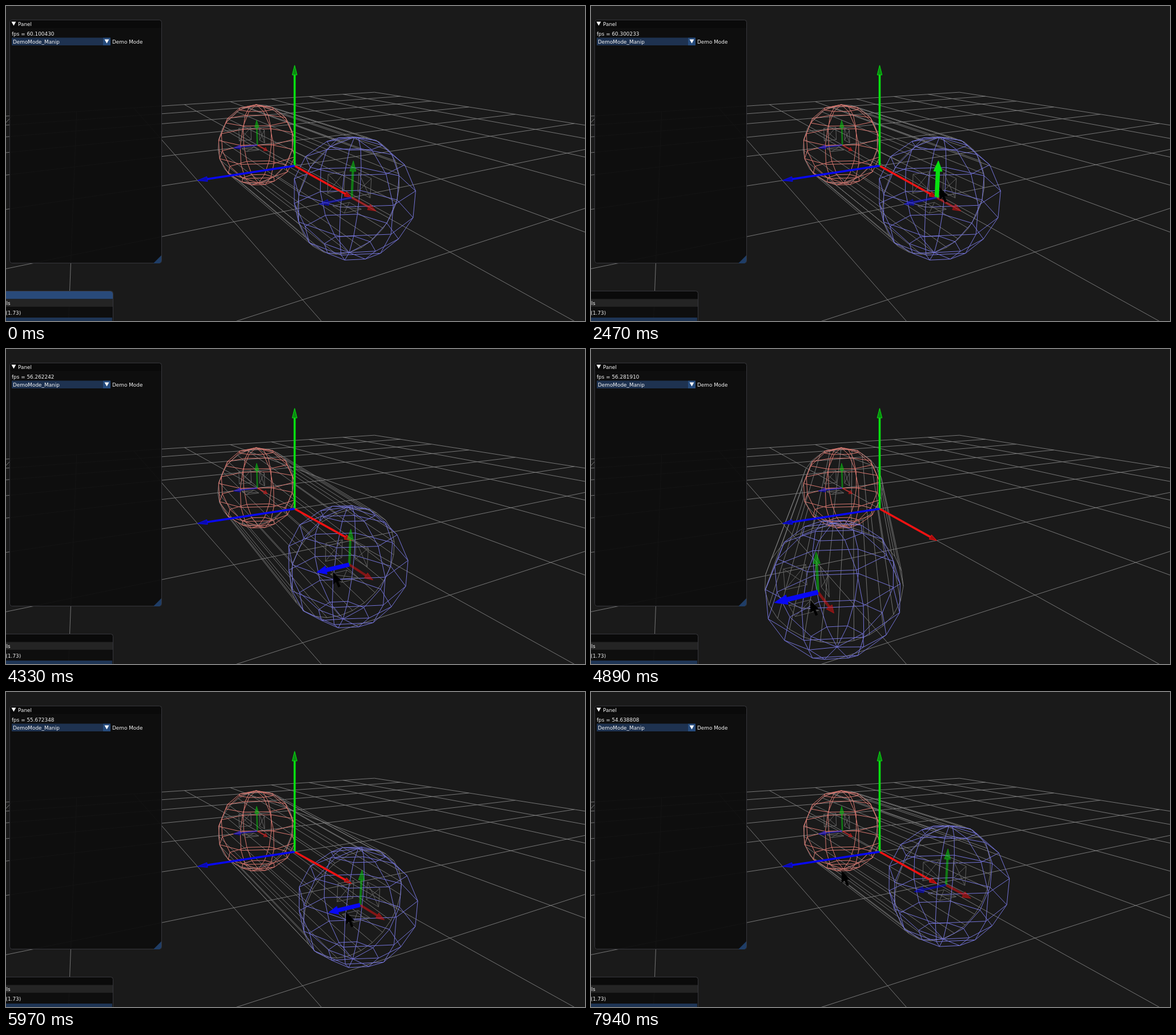
Recreate the animation shown at these times as an HTML page with a canvas. Size 1014 by 552 pixels, loop 8 s.

```html
<!DOCTYPE html>
<html lang="en">
<head>
<meta charset="utf-8">
<title>Gizmo demo</title>
<style>
html, body { margin: 0; width: 100%; height: 100%; overflow: hidden; background: #1a1a1a; }
canvas { display: block; width: 1014px; height: 552px; }
</style>
</head>
<body>
<canvas id="stage" width="1014" height="552"></canvas>
<script>
const ctx = document.getElementById('stage').getContext('2d');
const LOOP = 8000, START = 950, STEP = 109.2, TAU = Math.PI * 2;
const BALL_RADIUS = 0.5;
const GIZMO_LAG = 0.3; // the handles trail the ball by part of a step

// Orbit camera looking at the origin.
const cam = { f: 692.2, dist: 4.051, yawSin: 0.4625, yawCos: 0.8866, pitchSin: 0.29, pitchCos: 0.957, cx: 505.5, cy: 280 };

// Turning points of the drags, in steps: height and depth of the blue ball.
const ballKeys = [[14, 0, 0], [19, 0.6, 0], [25, -0.21, 0], [30.4, -0.21, 0], [35, -0.21, 1.15], [40, -0.21, -1.365],
  [47, -0.21, 0.03], [53, -0.21, 0.03], [55, -0.15, 0.33], [58, 0, -0.3], [60, -0.03, -0.095]];
// Pointer position relative to the blue gizmo on screen.
const pointerKeys = [[0, 265, 150], [7, 4, -18], [14, 5, -18], [21, -15, -4], [30, -29, 13], [40, -5, 15],
  [47, -26, 12], [55, -40, -22], [59, -38, -24], [64, -183, -25]];
const fpsKeys = [[0, 60.10043], [14, 60.300233], [21, 54.669527], [31, 56.262242], [40, 56.297645],
  [55, 54.734402], [60, 54.638808]];

const linear = u => u;
const smooth = u => u * u * (3 - 2 * u);

// The picture updates on a fixed beat and rests twice.
function stepAt(t) {
  const step = Math.floor((t - START) / STEP + 0.2);
  for (const [from, to] of [[11, 14], [51, 54]]) if (step > from && step < to) return from;
  return step;
}

function sample(keys, t, ease) {
  let i = 0;
  while (i < keys.length - 1 && keys[i + 1][0] <= t) i++;
  const a = keys[i], b = keys[i + 1] || a;
  const u = a === b ? 0 : Math.max(0, (t - a[0]) / (b[0] - a[0]));
  return a.slice(1).map((v, j) => v + (b[j + 1] - v) * ease(u));
}

const add = (a, b, k = 1) => a.map((v, i) => v + b[i] * k);
const cross = (a, b) => [a[1] * b[2] - a[2] * b[1], a[2] * b[0] - a[0] * b[2], a[0] * b[1] - a[1] * b[0]];
const unit = a => { const n = Math.hypot(...a); return a.map(v => v / n); };

function toView([x, y, z]) {
  const side = cam.yawSin * x - cam.yawCos * z;
  const near = cam.yawCos * x + cam.yawSin * z;
  return [side, y * cam.pitchCos - near * cam.pitchSin, cam.dist - near * cam.pitchCos - y * cam.pitchSin];
}
const toScreen = ([x, y, d]) => [cam.cx + cam.f * x / d, cam.cy - cam.f * y / d];
const project = p => toScreen(toView(p));

// Adds a 3D segment to the current path, cut at the near plane.
function segment(p, q) {
  const NEAR = 0.1;
  let a = toView(p), b = toView(q);
  if (a[2] < NEAR && b[2] < NEAR) return;
  if (a[2] < NEAR) [a, b] = [b, a];
  if (b[2] < NEAR) b = add(a, add(b, a, -1), (a[2] - NEAR) / (a[2] - b[2]));
  ctx.moveTo(...toScreen(a));
  ctx.lineTo(...toScreen(b));
}

function wire(color, width, build) {
  ctx.beginPath();
  build();
  ctx.strokeStyle = color;
  ctx.lineWidth = width;
  ctx.stroke();
}

function drawGrid() {
  wire('#808080', 0.9, () => {
    for (let i = -5; i <= 5; i++) {
      segment([i, 0, -5], [i, 0, 5]);
      segment([-5, 0, i], [5, 0, i]);
    }
  });
}

function drawSphere(center, color) {
  const LATS = 7, LONS = 8;
  const at = (i, j) => {
    const lat = Math.PI * i / LATS, lon = TAU * j / LONS;
    const dir = [Math.sin(lat) * Math.cos(lon), Math.cos(lat), Math.sin(lat) * Math.sin(lon)];
    return add(center, dir, BALL_RADIUS);
  };
  wire(color, 1, () => {
    for (let i = 0; i < LATS; i++) for (let j = 0; j < LONS; j++) {
      segment(at(i, j), at(i + 1, j));
      if (i) segment(at(i, j), at(i, j + 1));
    }
  });
}

function drawCylinder(start, end) {
  const SIDES = 24;
  const axis = unit(add(end, start, -1)), u = unit(cross([0, 1, 0], axis)), v = cross(axis, u);
  const rim = (c, i) => {
    const a = TAU * i / SIDES;
    return add(add(c, u, BALL_RADIUS * Math.cos(a)), v, BALL_RADIUS * Math.sin(a));
  };
  wire('#7c7c7c', 0.9, () => {
    for (let i = 0; i < SIDES; i++) {
      segment(rim(start, i), rim(end, i));
      segment(rim(start, i), rim(start, i + 1));
      segment(rim(end, i), rim(end, i + 1));
    }
  });
}

function polygon(color, ...points) {
  ctx.beginPath();
  points.forEach(p => ctx.lineTo(...p));
  ctx.closePath();
  ctx.fillStyle = color;
  ctx.fill();
}

function drawArrow(from, dir, size, head, shaftWidth, headWidth, color, fill) {
  const [a, b, tip] = [0, size * (1 - head), size].map(k => project(add(from, dir, k)));
  wire(color, shaftWidth, () => { ctx.moveTo(...a); ctx.lineTo(...b); });
  const [dx, dy] = unit(add(tip, a, -1));
  const across = [-dy, dx];
  polygon(fill, tip, add(b, across, headWidth / 2), add(b, across, -headWidth / 2));
  ctx.strokeStyle = color;
  ctx.lineWidth = 1;
  ctx.stroke();
}

const axes = [
  { name: 'x', dir: [1, 0, 0], bright: '#f01212', mid: '#a80c0c' },
  { name: 'y', dir: [0, 1, 0], bright: '#08e010', mid: '#0a8a10' },
  { name: 'z', dir: [0, 0, 1], bright: '#0808f4', mid: '#0a0ab0' }
];

function drawWorldAxes() {
  for (const a of axes) drawArrow([0, 0, 0], a.dir, 1, 0.09, 3.6, 8.5, a.bright, a.mid);
}

function drawPlane(center, u, v, half, hot) {
  const corner = (a, b) => add(add(center, u, a * half), v, b * half);
  const [p, q, r, s] = [corner(-1, -1), corner(1, -1), corner(1, 1), corner(-1, 1)];
  wire(hot ? '#b8f6fa' : '#686868', hot ? 2 : 0.9, () => {
    [[p, q], [q, r], [r, s], [s, p], [p, r], [q, s]].forEach(edge => segment(...edge));
  });
}

function drawGizmo(at, active, planeHot) {
  const SIZE = 0.31;
  const scale = 3.2 / toView(at)[2];
  axes.forEach(({ name }, i) => {
    const u = axes[(i + 1) % 3].dir, v = axes[(i + 2) % 3].dir;
    drawPlane(add(add(at, u, SIZE / 2), v, SIZE / 2), u, v, SIZE / 4, planeHot && name === 'x');
  });
  for (const { name, dir, bright } of axes) {
    const on = name === active;
    ctx.globalAlpha = on ? 1 : 0.48;
    drawArrow(at, dir, SIZE, 0.28, (on ? 7.5 : 4.2) * scale, (on ? 15 : 11) * scale, bright, bright);
  }
  ctx.globalAlpha = 1;
}

function text(str, x, y) {
  ctx.fillStyle = '#f4f4f4';
  ctx.fillText(str, x, y);
}

function box(x, y, w, h, color, radius = 0) {
  ctx.beginPath();
  ctx.roundRect(x, y, w, h, radius);
  ctx.fillStyle = color;
  ctx.fill();
}

function panel(x, y, w, h, titleColor) {
  box(x, y, w, h, 'rgba(14,14,14,.95)', 4);
  box(x, y, w, 13.5, titleColor, [4, 4, 0, 0]);
  ctx.beginPath();
  ctx.roundRect(x + 0.5, y - 0.5, w, h, 4);
  ctx.strokeStyle = '#36363b';
  ctx.lineWidth = 1;
  ctx.stroke();
}

const downArrow = (x, y) => polygon('#fff', [x, y], [x + 8, y], [x + 4, y + 7]);

function drawPanels(fps, lowerFocused) {
  ctx.font = '8.9px "DejaVu Sans", sans-serif';
  panel(6, 25, 266, 426, '#0a0a0a');
  polygon('#1f3d66', [258, 451], [272, 437], [272, 448], [269, 451]);
  downArrow(9.5, 27.5);
  text('Panel', 21, 35);
  text('fps = ' + fps.toFixed(6), 10, 51.5);
  box(10, 55.5, 160, 13.5, '#1e3250');
  box(170, 55.5, 13, 13.5, '#264b7c');
  downArrow(172.5, 58.5);
  text('DemoMode_Manip', 12, 66);
  text('Demo Mode', 186, 66);

  panel(-20, 500, 207, 80, lowerFocused ? '#294a7a' : '#0a0a0a');
  box(0, 513.5, 187, 13.5, '#242424');
  text('ls', 0.5, 524);
  text('(1.73)', -0.5, 541);
  box(0, 546, 186, 6, '#1e3555');
}

function drawPointer(at) {
  const shape = [[0, 0], [0, 22], [5, 17.5], [9, 27], [13, 25.3], [9, 16], [15.5, 16]];
  polygon('#000', ...shape.map(p => add(p, at)));
}

function draw(now) {
  const step = stepAt(now % LOOP);
  const during = (a, b) => step >= a && step < b;
  const ballAt = s => [1, ...sample(ballKeys, s, smooth)];
  const red = [-1, 0, 0], blue = ballAt(step), handle = ballAt(step - GIZMO_LAG);
  const active = during(7, 25) ? 'y' : during(28, 48) ? 'z' : '';

  ctx.fillStyle = '#1a1a1a';
  ctx.fillRect(0, 0, 1014, 552);
  drawGrid();
  drawCylinder(red, blue);
  drawSphere(red, '#d87870');
  drawSphere(blue, '#7474d8');
  drawWorldAxes();
  drawGizmo(red, '', false);
  drawGizmo(handle, active, during(21, 22) || during(50, 60));
  drawPanels(sample(fpsKeys, step, linear)[0], step < 14);
  if (step >= 0) drawPointer(add(project(handle), sample(pointerKeys, step, smooth)));
}

function tick() {
  draw(performance.now());
  requestAnimationFrame(tick);
}
tick();
</script>
</body>
</html>
```
